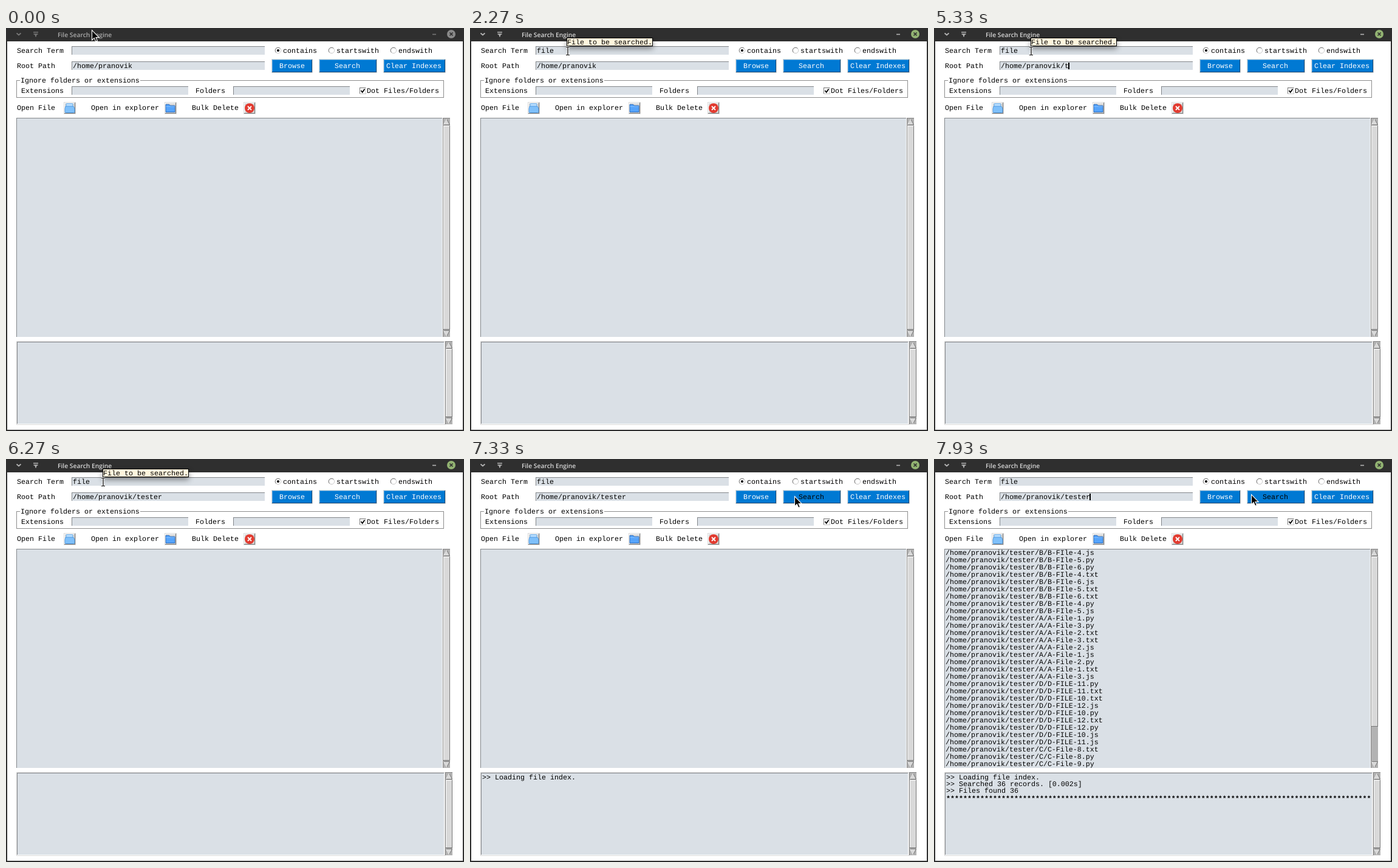
Write an HTML page that moves like this. It is 754 px wide and 664 px high and loops after 8000 ms.

```html
<!DOCTYPE html>
<html lang="en">
<head>
<meta charset="utf-8">
<title>File Search Engine</title>
<style>
html, body { margin: 0; width: 100%; height: 100%; overflow: hidden; background: #fff; }
svg { display: block; }
text { font: 11.667px "Liberation Mono", monospace; fill: #000; white-space: pre; text-rendering: geometricPrecision; }
#title { font: 600 10.3px "Open Sans", sans-serif; }
#stars { font-weight: bold; }
#tip { filter: drop-shadow(0 4px 5px rgba(0, 0, 0, .45)); }
</style>
</head>
<body>
<svg id="stage" width="754" height="664" viewBox="0 0 754 664"></svg>
<script>
const LOOP = 8000, STEP = 1000 / 15, CELL = 7;
const HOME = '/home/pranovik';
const INPUT = '#dae0e6', DARK = '#83868a', FACE = '#d9d9d9', BLUE = '#0079d3';

const rect = (x, y, w, h, fill, more = '') =>
  `<rect x="${x}" y="${y}" width="${w}" height="${h}" fill="${fill}" ${more}/>`;
const text = (x, y, s, more = '') => `<text x="${x}" y="${y}" ${more}>${s}</text>`;
const path = (d, more) => `<path d="${d}" ${more}/>`;
const group = (id, body) => `<g id="${id}">${body}</g>`;

// Box with a one pixel bevel: top-left and bottom-right colours
const bevel = (x, y, w, h, fill, tl, br, id = '') =>
  rect(x, y, w, h, br, id && `id="${id}Edge"`) + rect(x, y, w - 1, h - 1, tl, id && `id="${id}Lit"`) +
  rect(x + 1, y + 1, w - 2, h - 2, fill, id && `id="${id}"`);

// Bevelled box inside a one pixel focus ring
const ringed = (x, y, w, h, ...look) =>
  rect(x, y, w, h, FACE) + bevel(x + 1, y + 1, w - 2, h - 2, ...look);

const entry = (x, y, w) => bevel(x, y, w, 15, INPUT, DARK, '#fff');
const button = (x, y, w, label, tx, id) =>
  ringed(x, y, w, 23, BLUE, '#4ea3e2', '#00497d') + text(tx, y + 15, label, `id="${id}" style="fill:#fff"`);

const radio = (x, label, on) =>
  `<circle cx="${x}" cy="37" r="4.7" fill="#fff" stroke="#c8c8c8"/>` +
  path(`M${x - 3.4} 40.4A4.7 4.7 0 0 1 ${x + 3.4} 33.6`, 'fill="none" stroke="#777"') +
  (on ? `<circle cx="${x}" cy="37" r="2.1"/>` : '') + text(x + 8, 41, label);

function scrollbar(x, y, h, id) {
  const w = 13, m = x + w / 2, l = x + 1.5, r = x + w - 1.5, b = y + h;
  const arrow = (tip, base) =>
    path(`M${m} ${tip}L${r} ${base}H${l}Z`, `fill="${FACE}" stroke="#777"`) +
    path(`M${m} ${tip}L${l} ${base}`, 'stroke="#fff"');
  return bevel(x, y, w, h, '#b3b3b3', '#828282', '#fff') +
    arrow(y + 2, y + 11.5) + arrow(b - 2, b - 11.5) +
    bevel(x + 1, y + 13, w - 2, h - 26, FACE, '#fff', '#777', id);
}

const iconBox = x => ringed(x, 122, 20, 20, FACE, '#fff', '#777');

function icons() {
  const printer = iconBox(95) +
    rect(99, 124.5, 11, 8, '#b5dcff', 'stroke="#4f9ce0" stroke-width=".8" rx="1"') +
    path('M98 129H111L113 133V138Q113 139.500 111.500 139.500H98.500Q97 139.500 97 138V133Z',
      'fill="#7fc0fa" stroke="#3f8fdb" stroke-width=".8"');
  const folder = iconBox(261) +
    path('M263 126H268.500L270.500 128H278V138.500H263Z', 'fill="#56a4fb" stroke="#1f63b8" stroke-width=".9"') +
    path('M263.500 129.500H277.500', 'stroke="#83bfff"');
  const remove = iconBox(391) + '<circle cx="401" cy="132" r="8" fill="#e23b30"/>' +
    path('M398 129L404 135M404 129L398 135', 'stroke="#fff" stroke-width="1.9"');
  return printer + folder + remove;
}

function results() {
  const names = { A: 'File', B: 'FIle', C: 'File', D: 'FILE' };
  const found = 'B4js B5py B6py B4txt B6js B5txt B6txt B4py B5js A1py A3py A2txt A3txt A2js A1js ' +
    'A2py A1txt A3js D11py D11txt D10txt D12js D10py D12txt D12py D10js D11js C8txt C8py C9py';
  return found.split(' ').map((f, i) => {
    const [, dir, n, ext] = f.match(/(\w)(\d+)(\w+)/);
    return text(19, 158 + i * 12, `${HOME}/tester/${dir}/${dir}-${names[dir]}-${n}.${ext}`);
  }).join('');
}

const log = (row, s) => text(20, 528 + row * 11, s);

function scene() {
  const titleBar = rect(0, 0, 754, 664, '#2f2f2f') + rect(2, 22, 750, 640, '#fff') +
    text(85, 15, 'File Search Engine', 'id="title"') +
    group('marks', path('M17.500 8.500L21 11.500L24.500 8.500', 'fill="none" stroke-width="1.8"') +
      path('M45 7H53M45.500 10H52.500M49 10V14.500', 'fill="none" stroke-width="1.7"') +
      path('M46.500 10.500L49 12.500L51.500 10.500', 'fill="none" stroke-width="1"') +
      path('M702 10.500H708', 'stroke-width="1.6"')) +
    '<circle id="close" cx="733" cy="10" r="7"/>' +
    path('M730.500 7.500L735.500 12.500M735.500 7.500L730.500 12.500', 'stroke="#2f2f2f" stroke-width="1.7"');

  const form = text(18, 41, 'Search Term') + text(18, 66, 'Root Path') +
    entry(108, 30, 319) + entry(108, 55, 319) +
    rect(110, 57, 98, 11, '#c3c3c3', 'id="selection"') +
    text(110, 41, '', 'id="term"') + text(110, 66, '', 'id="root"') +
    rect(0, 0, 2, 11, '#000', 'id="caret"') +
    radio(448, 'contains', true) + radio(536, 'startswith') + radio(638, 'endswith') +
    button(437, 51, 68, 'Browse', 450, 'browse') +
    button(515, 51, 96, 'Search', 541, 'search') +
    button(621, 51, 103, 'Clear Indexes', 626, 'clear');

  const ignore = rect(17.5, 86.5, 703, 28, 'none', 'stroke="#8c8c8c"') + rect(23, 82, 198, 10, '#fff') +
    text(24, 90, 'Ignore folders or extensions') +
    text(25, 107, 'Extensions') + entry(108, 96, 193) +
    text(312, 107, 'Folders') + entry(374, 96, 193) +
    bevel(582, 98, 11, 11, '#fff', '#777', '#c8c8c8') +
    path('M584.500 103L586.700 106L590.500 100.500', 'fill="none" stroke="#000" stroke-width="1.8"') +
    text(594, 107, 'Dot Files/Folders');

  const tools = text(18, 135, 'Open File') + text(140, 135, 'Open in explorer') +
    text(306, 135, 'Bulk Delete') + icons();

  const panes = bevel(17, 148, 702, 362, INPUT, DARK, '#fff') + scrollbar(719, 148, 362, 'slider') +
    ringed(17, 516, 706, 138, INPUT, DARK, '#fff') + scrollbar(723, 516, 138, 'logSlider') +
    group('list', results()) + group('loading', log(0, '&gt;&gt; Loading file index.')) +
    group('summary', log(1, '&gt;&gt; Searched 36 records. [0.002s]') +
      log(2, '&gt;&gt; Files found 36') + text(20, 563, '*'.repeat(100), 'id="stars"'));

  const tip = group('tip', rect(159.5, 16.5, 141, 13, '#fff5dd', 'stroke="#000"') +
    text(160, 27, 'File to be searched.'));

  const beam = 'M-3 -6.500H-1L0 -6L1 -6.500H3M0 -6V6M-3 6.500H-1L0 6L1 6.500H3';
  const pointers = group('arrow', path('M.5 .5V17L4.200 13.400L6.800 19.300L9.400 18.200L7 12.600H12.200Z',
      'fill="#000" stroke="#fff" stroke-width="1.1"')) +
    group('beam', path(beam, 'fill="none" stroke="#fff" stroke-width="3"') +
      path(beam, 'fill="none" stroke="#000" stroke-width="1.2"'));

  return titleBar + form + ignore + tools + panes + tip + pointers;
}

document.getElementById('stage').innerHTML = scene();
const el = {};
document.querySelectorAll('[id]').forEach(n => el[n.id] = n);

const show = (n, on) => n.setAttribute('visibility', on ? 'visible' : 'hidden');
const typed = (t, s, times) => s.slice(0, times.filter(k => t >= k).length);
const within = (t, spans) => spans.some(([a, b]) => t >= a && t < b);

// Pointer moves: start, end, x, y at the end
const MOVES = [
  [467, 800, 158, 45], [933, 1133, 161, 38], [3600, 3667, 160, 38],
  [6533, 7200, 534, 61], [7533, 7667, 523, 58], [7867, 7933, 522, 58]
];
const TERM_KEYS = [1800, 1867, 1930, 2070];
const ROOT_KEYS = [4330, 5330, 5400, 5530, 5670, 5870, 6000];
const TERM_CARET = [[800, 1470], [1800, 2270]];
const ROOT_CARET = [[3000, 3600], [3870, 4470], [4800, 5400], [5730, 6270], [6600, 7200], [7400, LOOP]];

function pointerAt(t) {
  const q = Math.floor((t + 4) / STEP) * STEP;
  let x = 141, y = 3;
  for (const [a, b, tx, ty] of MOVES) {
    const k = Math.min(1, Math.max(0, (q - a) / (b - a) + 1e-6));
    const e = k * k * (3 - 2 * k);
    x += (tx - x) * e;
    y += (ty - y) * e;
  }
  return [Math.round(x), Math.round(y)];
}

function setSlider(h) {
  el.sliderEdge.setAttribute('height', h);
  el.sliderLit.setAttribute('height', h - 1);
  el.slider.setAttribute('height', h - 2);
}

function draw(t) {
  const active = t >= 600;
  el.title.style.fill = active ? '#d8d8d8' : '#aaa';
  el.marks.setAttribute('stroke', active ? '#b4b4b4' : '#777');
  el.close.setAttribute('fill', active ? '#92b372' : '#8a8a8a');

  const term = typed(t, 'file', TERM_KEYS);
  const root = HOME + typed(t, '/tester', ROOT_KEYS);
  el.term.textContent = term;
  el.root.textContent = root;

  const inRoot = t >= 3000;
  el.caret.setAttribute('x', 109 + CELL * (inRoot ? root : term).length);
  el.caret.setAttribute('y', inRoot ? 57 : 32);
  show(el.caret, within(t, inRoot ? ROOT_CARET : TERM_CARET));
  show(el.selection, within(t, [[3000, 3470]]));

  const [x, y] = pointerAt(t);
  const overField = top => x >= 108 && x < 427 && y >= top && y < top + 15;
  const overTerm = overField(30), beam = overTerm || overField(55);
  show(el.beam, beam);
  show(el.arrow, !beam);
  el.beam.setAttribute('transform', `translate(${x} ${y})`);
  el.arrow.setAttribute('transform', `translate(${x} ${y})`);
  show(el.tip, overTerm && t >= 1867);

  const hover = (a, b) => y >= 51 && y < 74 && x >= a && x < b ? '#000' : '#fff';
  el.browse.style.fill = hover(437, 505);
  el.search.style.fill = hover(515, 611);

  const done = t >= 7400;
  show(el.loading, t >= 7330);
  show(el.list, done);
  show(el.summary, done);
  setSlider(done ? 280 : 336);
}

function tick() {
  draw((performance.now() + 2) % LOOP);
  requestAnimationFrame(tick);
}
tick();
</script>
</body>
</html>
```
